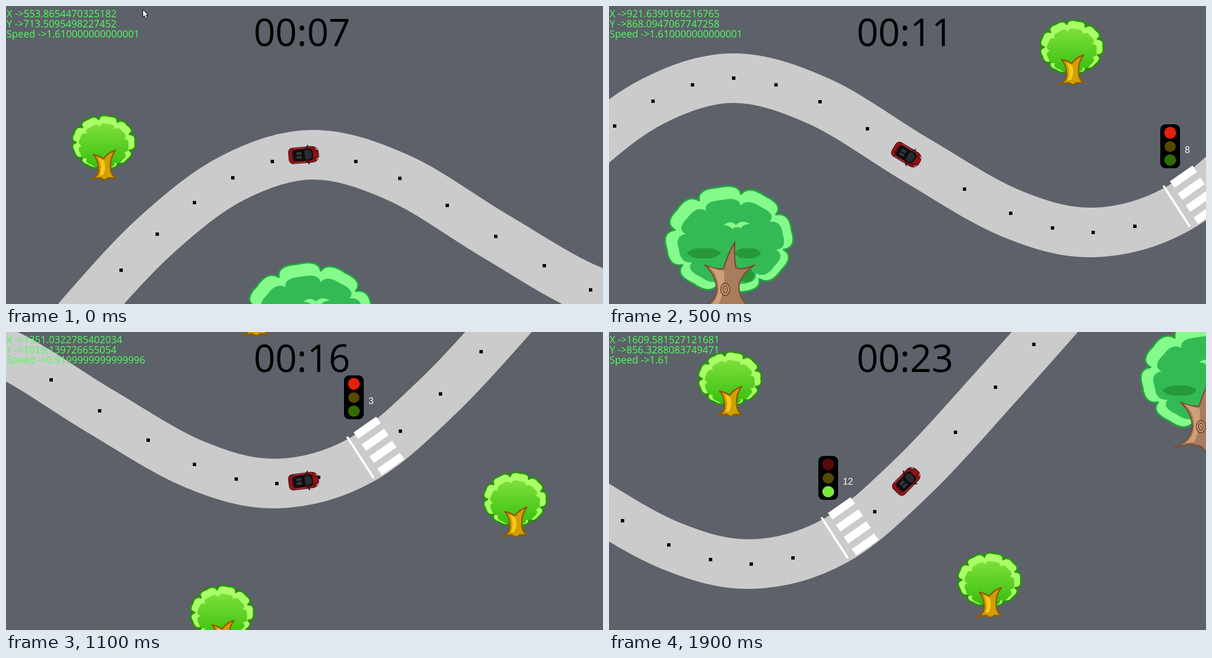
Animation of 1058x529 px, one loop 2 s. Source, as an HTML page with a canvas:

```html
<!DOCTYPE html>
<html lang="en">
<head>
<meta charset="utf-8">
<title>Driving simulation</title>
<style>
html, body { margin: 0; width: 100%; height: 100%; overflow: hidden; background: #5d6169; }
canvas { display: block; }
</style>
</head>
<body>
<canvas id="stage" width="1058" height="529"></canvas>
<script>
const ctx = document.getElementById('stage').getContext('2d');
const TAU = 2 * Math.PI;
const STEP = 100, STEPS = 20;
const SCALE = 0.8816, ORIGIN = [554.4, 713.5];
const TOP = 1.610000000000001, CREEP = 0.026000000000000002, START = 15;

// Moments the car passes: step, X, Y, heading in degrees
const moments = [
  [0, 553.8654470325182, 713.5095498227452, -5],
  [2, 710.179913310722, 742.3162198358243, 20],
  [5, 921.6390166216765, 868.0947067747258, 31],
  [7, 1062.6692729183412, 952.201901352817, 27],
  [11, 1351.0322785402034, 1019.139726655054, -7],
  [START, 1397.3948470714372, 1004.3900128655858, -19],
  [19, 1609.581527121681, 856.3288083749471, -46],
];

const knots = [
  [10, 700], [140, 541], [268, 405], [402, 305], [545, 264], [698, 306], [868, 409],
  [1036, 504], [1182, 538], [1330, 497], [1472, 379], [1615, 224], [1750, 72], [1880, -75],
];
const STOP_KNOT = 9;
const smallTrees = [[173, 252], [1144, 219], [1085, 777], [1604, 576]];
const bigTrees = [[537, 456], [1986, 111]];

// Brake for the red light, wait, then pull away on green
function speedAt(step) {
  if (step >= START) return Math.min(1.61, CREEP + 0.96 * (step - START));
  return Math.max(CREEP, Math.min(TOP, 0.9199999999999996 - 0.493 * (step - 11)));
}

function travel(from, to) {
  let sum = 0;
  for (let i = 0; i < 100; i++) sum += speedAt(from + (to - from) * (i + 0.5) / 100) * (to - from);
  return sum;
}

function carAt(step) {
  let i = 0;
  while (i < moments.length - 2 && moments[i + 1][0] <= step) i++;
  const a = moments[i], b = moments[i + 1];
  const u = travel(a[0], step) / travel(a[0], b[0]);
  const chord = 1.02 * Math.hypot(b[1] - a[1], b[2] - a[2]);
  const hermite = (k, wave) => {
    const slope = m => wave(m[3] * TAU / 360) * chord;
    const h = u * u * (3 - 2 * u);
    return a[k] * (1 - h) + b[k] * h + slope(a) * u * (1 - u) ** 2 - slope(b) * u * u * (1 - u);
  };
  return { x: hermite(1, Math.cos), y: hermite(2, Math.sin), heading: a[3] + (b[3] - a[3]) * u };
}

const road = new Path2D(), dots = [];
knots.slice(0, -1).forEach((b, i) => {
  const a = knots[i - 1] || b, c = knots[i + 1], d = knots[i + 2] || c;
  const mix = f => [f(0), f(1)];
  if (i === 0) road.moveTo(...b);
  road.bezierCurveTo(...mix(k => b[k] + (c[k] - a[k]) / 6), ...mix(k => c[k] - (d[k] - b[k]) / 6), ...c);
  if (i !== STOP_KNOT) dots.push(b);
  dots.push(mix(k => (9 * (b[k] + c[k]) - a[k] - d[k]) / 16));
});

function ellipse(x, y, rx, ry, color) {
  ctx.fillStyle = color;
  ctx.beginPath();
  ctx.ellipse(x, y, rx, ry, 0, 0, TAU);
  ctx.fill();
}

function box(x, y, w, h, r, color) {
  ctx.fillStyle = color;
  ctx.beginPath();
  ctx.roundRect(x, y, w, h, r);
  ctx.fill();
}

function shape(d, fill, stroke, width = 1) {
  const path = new Path2D(d);
  ctx.lineWidth = width;
  ctx.lineJoin = 'round';
  if (fill) { ctx.fillStyle = fill; ctx.fill(path); }
  if (stroke) { ctx.strokeStyle = stroke; ctx.stroke(path); }
}

function line(x1, y1, x2, y2, width, color) {
  shape(`M${x1} ${y1}L${x2} ${y2}`, null, color, width);
}

// Ellipse with scalloped edge; one lobe points at the given angle
function cloud(x, y, rx, ry, lobes, angle, fill, stroke) {
  const point = (k, r) => {
    const t = angle + (k - 0.5) * TAU / lobes;
    return `${x + rx * r * Math.cos(t)} ${y + ry * r * Math.sin(t)}`;
  };
  let d = 'M' + point(0, 0.92);
  for (let k = 0; k < lobes; k++) d += `Q${point(k + 0.1, 1.14)} ${point(k + 0.5, 1.05)}T${point(k + 1, 0.92)}`
    .replace(/T/, `Q${point(k + 0.9, 1.14)} `);
  shape(d + 'Z', fill, stroke, 3);
}

function text(str, x, y, font, color) {
  ctx.font = font;
  ctx.fillStyle = color;
  ctx.fillText(str, x, y);
}

function at([x, y], draw) {
  ctx.save();
  ctx.translate(x, y);
  draw();
  ctx.restore();
}

function smallTree() {
  const leaf = ctx.createLinearGradient(0, -45, 0, 38);
  leaf.addColorStop(0, '#7fe03c');
  leaf.addColorStop(1, '#35bd0c');
  cloud(0, -10, 53, 45, 9, -1.4, '#a9ff66', '#249408');
  cloud(0, -4, 42, 37, 9, -1.4, leaf);
  shape('M-24 56Q-9 52-9 38Q-9 22-18 12Q-8 14 0 19Q8 8 21 4Q12 16 12 32Q12 48 22 54L9 53L2 57L-6 53Z',
    '#d0a000', '#8d5908', 2.5);
  shape('M-9 17Q-1 32-7 49L-1 48Q6 32 0 22Z', '#f8c81c');
}

function bigTree() {
  cloud(0, 95, 107, 90, 8, -1.75, '#85fb8c', '#23a440');
  cloud(3, 99, 89, 72, 8, -1.75, '#33ba55');
  shape('M-10 69Q3 59 12 69Q21 58 37 67Q25 67 21 74Q12 70 5 76Q1 69-10 69Z', '#85fb8c');
  cloud(-45, 119, 28, 9, 6, 0, '#279838');
  cloud(33, 119, 22, 9, 6, 0, '#279838');
  cloud(30, 158, 14, 12, 5, 0, '#279838');
  shape('M-55 220Q-25 209-22 184Q-23 158-43 140Q-22 149-10 146Q-2 119 10 99Q8 126 12 145Q25 149 45 140Q20 157 17 178Q18 207 46 219L22 215L10 235L-7 218L-26 214Z',
    '#a77d5e', '#795039', 2.5);
  shape('M-37 143Q-20 155-19 180Q-19 200-34 212L-19 210Q-7 187-9 151Z', '#cf9f79');
  for (let k = 0; k < 5; k++) ellipse(-7, 183, 9 - 2 * k, 12 - 2.3 * k, k % 2 ? '#cf9f79' : '#795039');
}

function trafficLight(clock) {
  const green = clock >= 20.3;
  box(-17.5, -39, 35, 78, 9, '#000');
  ellipse(0, -24, 10.5, 10.5, green ? '#560a0a' : '#e4200e');
  ellipse(0, 0.5, 10, 9.5, '#564800');
  ellipse(0, 24.5, 10.5, 10, green ? '#7de83c' : '#316a02');
  text(Math.floor((green ? 35.7 : 20.3) - clock), 26, 12, '16px "Liberation Sans", Arial, sans-serif', '#fff');
}

function car(heading) {
  ctx.rotate(heading * TAU / 360);
  box(-27, -14.5, 54, 29, [8, 12, 12, 8], '#3a0a0a');
  box(-26, -13.5, 52, 27, [7, 11, 11, 7], '#8e1517');
  box(-21, -11.5, 38, 23, 7, '#4a1012');
  box(-18, -10, 34, 20, 5, '#0d0d0f');
  shape('M5-9Q12-8 14-4V4Q12 8 5 9L2 6V-6Z', '#292c30');
  for (const side of [-1, 1]) {
    box(-13, 3.5 * side - 2.5, 10, 5, 2, '#34363a');
    line(16, 9 * side, 25, 5 * side, 1.2, '#480808');
    line(6, 12 * side, 9, 17 * side, 2, '#210909');
    line(22, 10 * side, 25, 7 * side, 1.5, '#d8b0a8');
    line(-17, 12.5 * side, 3, 12.5 * side, 1, '#cf4a46');
  }
}

function render(step) {
  const { x, y, heading } = carAt(step);
  const clock = 7.2 + 0.86 * step;
  ctx.fillStyle = '#5d6169';
  ctx.fillRect(0, 0, 1058, 529);

  const camera = [x, y].map((v, k) => -Math.round((v - ORIGIN[k]) * SCALE));
  at(camera, () => {
    ctx.lineWidth = 88;
    ctx.strokeStyle = '#cbcbcb';
    ctx.stroke(road);
    ctx.fillStyle = '#000';
    for (const [dx, dy] of dots) ctx.fillRect(Math.round(dx) - 3, Math.round(dy) - 3, 6, 6);
    line(1306.5, 455, 1353.5, 528, 4, '#fff');
    for (let i = 0; i < 4; i++) {
      const sx = 1342 + 14 * i, sy = 439 + 21.4 * i;
      line(sx - 20, sy + 14, sx + 20, sy - 14, 14, '#fff');
    }
    smallTrees.forEach(p => at(p, smallTree));
    bigTrees.forEach(p => at(p, bigTree));
    at([1318.5, 385], () => trafficLight(clock));
  });

  at([527.5, 264.5], () => car(heading));

  ['X ->' + x, 'Y ->' + y, 'Speed ->' + speedAt(step)].forEach((row, i) =>
    text(row, 1, 20 + 17.8 * i, '17.5px "Open Sans", sans-serif', '#4dff5c'));
  text('00:' + String(Math.floor(clock)).padStart(2, '0'), 439, 71, '500 67px "Open Sans", sans-serif', '#000');
  if (step === 0) {
    at([242, 6], () => shape('M.5.5V14L3.5 11L6 16.5L8.5 15.5L6 10H10Z', '#fff', '#000'));
  }
}

function tick() {
  render(Math.floor(performance.now() / STEP) % STEPS);
  requestAnimationFrame(tick);
}
tick();
</script>
</body>
</html>
```
